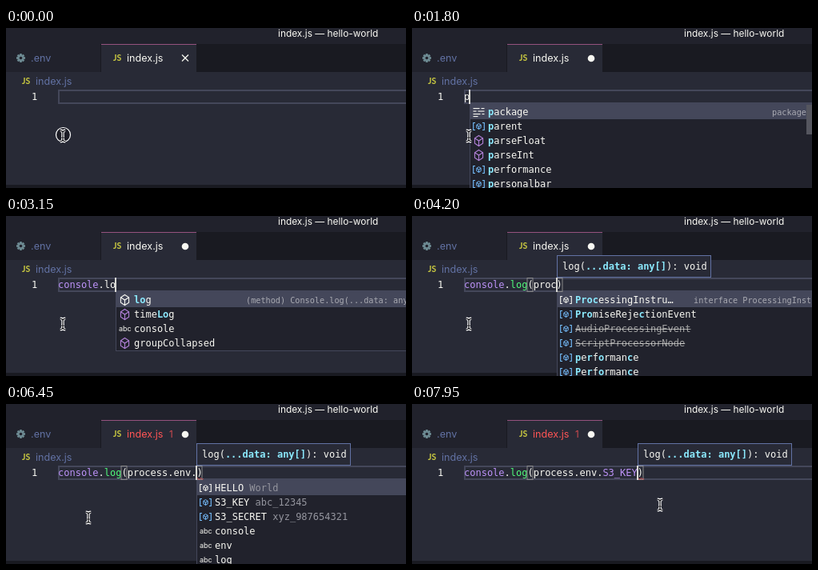
An HTML page with a canvas that plays this animation: 500x200 px, repeating every 8000 ms.

```html
<!DOCTYPE html>
<html lang="en">
<head>
<meta charset="utf-8">
<title>Editor typing</title>
<style>
  html, body { margin: 0; width: 100%; height: 100%; overflow: hidden; background: #282a36; }
  canvas { display: block; width: 500px; height: 200px; }
</style>
</head>
<body>
<canvas id="stage"></canvas>
<script>
const LOOP = 8000, STEP = 150;
const MONO = '"DejaVu Sans Mono", monospace';
const UI = 'Inter, sans-serif';
const C = {
  editor: '#282a36', bar: '#21222c', strip: '#191a21', line: '#44475a', fg: '#f8f8f2',
  muted: '#6272a4', purple: '#bd93f9', green: '#50fa7b', cyan: '#8be9fd', red: '#ff5555',
  yellow: '#cbcb41', gear: '#6d8a92', detail: '#a9aab2', variable: '#75beff', method: '#b180d7'
};
const LEFT = 65, ROW = 18, LINE_TOP = 77, LIST_TOP = 95;

const canvas = document.getElementById('stage');
const ctx = canvas.getContext('2d');
const ratio = window.devicePixelRatio || 1;
canvas.width = 500 * ratio;
canvas.height = 200 * ratio;
ctx.scale(ratio, ratio);
ctx.font = `12px ${MONO}`;
const CW = ctx.measureText('m').width;

// Each entry: kind, label, and optionally an inline value or a side note with its offset.
// Kinds: k keyword, v variable, m method, t plain word.
const item = (kind, label, extra = {}) => ({ kind, label, ...extra });
const items = (kind, names) => names.split(' ').map(name => item(kind, name));
const old = label => item('v', label, { deprecated: true });
const processing = item('v', 'ProcessingInstru…', { note: 'interface ProcessingInstruction', at: 171 });
const logCall = item('m', 'log', { note: '(method) Console.log(...data: any[]): void', at: 163 });
const audioNodes = [old('AudioProcessingEvent'), old('ScriptProcessorNode')];
const LISTS = {
  p: [item('k', 'package', { note: 'package', at: 378 }), item('v', 'parent'),
      ...items('m', 'parseFloat parseInt'), ...items('v', 'performance personalbar')],
  pro: [item('m', 'prompt'), processing, ...items('v', 'ProgressEvent Promise PromiseRejectionEvent'), item('k', 'protected')],
  proc: [processing, item('v', 'PromiseRejectionEvent'), ...audioNodes, ...items('v', 'performance Performance')],
  proce: [processing, ...audioNodes],
  c: [...items('v', 'caches'), ...items('m', 'cancelAnimationFrame cancelIdleCallback'), ...items('k', 'case catch class')],
  con: [item('v', 'console'), item('k', 'const'), item('k', 'continue'), item('m', 'confirm'),
        ...items('v', 'ConstantSourceNode ConvolverNode')],
  members: items('m', 'assert clear count countReset debug dir'),
  log: [logCall, item('m', 'timeLog'), item('t', 'console'), item('m', 'groupCollapsed')],
  words: items('t', 'console log'),
  word: items('t', 'console'),
  env: [item('v', 'HELLO', { value: 'World' }), item('v', 'S3_KEY', { value: 'abc_12345' }),
        item('v', 'S3_SECRET', { value: 'xyz_987654321' }), ...items('t', 'console env log process')]
};

// Start time, text before the caret, open suggestion list.
const CALL = 'console.log(';
const EDITS = [
  [0, ''], [1050, 'p'], [1200, 'pro', 'pro'], [1650, 'pr', 'pro'], [1800, 'p', 'p'], [1950, ''],
  [2100, 'c', 'c'], [2250, 'con', 'con'], [2400, 'cons', 'con'], [2700, 'console'],
  [2850, 'console.', 'members'], [3000, 'console.l', 'log'], [3150, 'console.lo', 'log'],
  [3300, 'console.log', 'log'], [3450, CALL],
  [3900, CALL + 'p', 'p'], [4050, CALL + 'pro', 'pro'], [4200, CALL + 'proc', 'proc'],
  [4350, CALL + 'proce', 'proce'], [4500, CALL + 'proces', 'proce'], [4650, CALL + 'process', 'proce'],
  [4800, CALL + 'process.', 'words'], [4950, CALL + 'process.en', 'word'], [5100, CALL + 'process.env'],
  [5550, CALL + 'process.env.', 'env'], [7800, CALL + 'process.env.S3_KEY']
];

const MOUSE = [[103, 142], [150, 147], [197, 147], [241, 143], [276, 136], [300, 129], [310, 126]];

function box(x, y, w, h, fill) {
  ctx.fillStyle = fill;
  ctx.fillRect(x, y, w, h);
}

function frame(x, y, w, h, color, weight = 1) {
  ctx.strokeStyle = color;
  ctx.lineWidth = weight;
  ctx.strokeRect(x + weight / 2, y + weight / 2, w - weight, h - weight);
}

function label(text, x, y, color, font) {
  ctx.font = font;
  ctx.fillStyle = color;
  ctx.fillText(text, x, y);
}

function mono(text, x, y, color = C.fg, bold = false) {
  label(text, x, y, color, `${bold ? 'bold ' : ''}12px ${MONO}`);
  return x + text.length * CW;
}

function stroke(color, width, points, closed) {
  ctx.strokeStyle = color;
  ctx.lineWidth = width;
  ctx.beginPath();
  points.forEach(([x, y]) => ctx.lineTo(x, y));
  if (closed) ctx.closePath();
  ctx.stroke();
}

function disc(x, y, r, fill) {
  ctx.fillStyle = fill;
  ctx.beginPath();
  ctx.arc(x, y, r, 0, Math.PI * 2);
  ctx.fill();
}

function gear(x, y) {
  for (let i = 0; i < 8; i++) {
    ctx.save();
    ctx.translate(x, y);
    ctx.rotate(i * Math.PI / 4);
    box(-1.3, -5.5, 2.6, 3, C.gear);
    ctx.restore();
  }
  disc(x, y, 4.2, C.gear);
  disc(x, y, 1.8, C.bar);
}

function cube(x, y, r, color, width) {
  const corner = i => [x + r * 0.9 * Math.sin(i * Math.PI / 3), y - r * Math.cos(i * Math.PI / 3)];
  stroke(color, width, [0, 1, 2, 3, 4, 5].map(corner), true);
  stroke(color, width, [corner(5), [x, y], corner(1)]);
  stroke(color, width, [[x, y], corner(3)]);
}

function icon(kind, x, y, selected) {
  if (kind === 't') {
    label('abc', x - 7.5, y + 3, C.fg, `9px ${UI}`);
  } else if (kind === 'm') {
    cube(x, y, 6.5, selected ? C.fg : C.method, 1.1);
  } else if (kind === 'v') {
    const color = selected ? C.fg : C.variable;
    for (const s of [-1, 1])
      stroke(color, 1.1, [[x + s * 4.5, y - 4.5], [x + s * 6.8, y - 4.5], [x + s * 6.8, y + 4.5], [x + s * 4.5, y + 4.5]]);
    cube(x, y, 3.4, color, 1);
  } else {
    for (const [dx, dy, w] of [[-7, -5, 8], [3, -5, 4], [-7, -1.5, 4], [-1, -1.5, 8], [-7, 2, 9], [4, 2, 3], [-7, 5, 6]])
      box(x + dx, y + dy, w, 1.1, C.fg);
  }
}

// Indices of the letters that match the typed query.
function matches(text, query) {
  const low = text.toLowerCase(), q = query.toLowerCase();
  const start = low.indexOf(q);
  if (start >= 0) return [...q].map((_, i) => start + i);
  const found = [];
  for (let i = 0; i < low.length && found.length < q.length; i++)
    if (low[i] === q[found.length]) found.push(i);
  return found.length === q.length ? found : [];
}

function suggestions(list, x, query, mouse) {
  const height = list.length * ROW + 2;
  box(x, LIST_TOP, 430, height, C.bar);
  list.forEach((entry, i) => {
    const top = LIST_TOP + 1 + i * ROW, base = top + 13;
    const hovered = mouse[0] > x && mouse[1] >= top && mouse[1] < top + ROW;
    if (i === 0) box(x, top, 430, ROW, C.line);
    else if (hovered) box(x, top, 430, ROW, 'rgba(68,71,90,.46)');
    icon(entry.kind, x + 11.5, top + 9, i === 0);

    const textX = x + 23, hits = matches(entry.label, query);
    ctx.globalAlpha = entry.deprecated ? 0.6 : 1;
    [...entry.label].forEach((ch, k) => {
      const hit = hits.includes(k) && !entry.deprecated;
      mono(ch, textX + k * CW, base, hit ? C.cyan : C.fg, hit);
    });
    if (entry.deprecated) box(textX, top + 9, entry.label.length * CW, 1, C.fg);
    ctx.globalAlpha = 1;
    if (entry.value) mono(entry.value, textX + (entry.label.length + 1) * CW, base, '#94959e');
    if (entry.note) label(entry.note, x + entry.at, base - 0.5, C.detail, `10.2px ${MONO}`);
  });
  frame(x, LIST_TOP, 430, height, C.line);
  if (list === LISTS.p) box(x + 421, LIST_TOP + 1, 9, 37, '#55565f');
}

function hint(x) {
  box(x, 49, 193, 28, C.editor);
  frame(x, 49, 193, 28, C.muted);
  let end = mono('log(', x + 7, 67);
  end = mono('...data: any[]', end, 67, C.cyan, true);
  mono('): void', end, 67);
}

function code(text) {
  const [, object, dot, method, rest] = /^(\w*)(\.?)(\w*)(.*)$/.exec(text);
  let x = mono(object, LEFT, 90, dot ? C.purple : C.fg);
  x = mono(dot, x, 90);
  x = mono(method, x, 90, rest ? C.green : C.fg);
  const [plain, key = ''] = rest.split(/(S3_KEY)/);
  x = mono(plain, x, 90);
  mono(key, x, 90, C.purple);
}

function squiggle(x) {
  const points = [];
  for (let i = 0; i <= 8; i++) points.push([x + i, 93.5 - Math.sin(i * Math.PI / 2)]);
  stroke(C.red, 1, points);
}

function pointer([x, y], pressed) {
  if (pressed) {
    ctx.beginPath();
    ctx.arc(x + 0.5, y - 1.5, 9, 0, Math.PI * 2);
    ctx.fillStyle = 'rgba(20,20,26,.6)';
    ctx.fill();
    ctx.strokeStyle = '#fff';
    ctx.lineWidth = 1.2;
    ctx.stroke();
  }
  for (const [color, width] of [['#fff', 3.4], ['#15151a', 1.2]]) {
    ctx.strokeStyle = color;
    ctx.lineWidth = width;
    ctx.beginPath();
    for (const s of [-1, 1]) {
      ctx.moveTo(x - 3.2, y + s * 6.7);
      ctx.quadraticCurveTo(x, y + s * 6.7, x, y + s * 4.5);
      ctx.quadraticCurveTo(x, y + s * 6.7, x + 3.2, y + s * 6.7);
    }
    ctx.moveTo(x, y - 5);
    ctx.lineTo(x, y + 5);
    ctx.moveTo(x - 2, y + 2);
    ctx.lineTo(x + 2, y + 2);
    ctx.stroke();
  }
}

function chrome(dirty, failed) {
  box(0, 0, 500, 200, C.editor);
  box(0, 0, 500, 20, C.bar);
  label('index.js — hello-world', 340, 11, C.fg, `11.9px ${UI}`);
  box(0, 20, 500, 35, C.strip);
  box(0, 20, 118, 35, C.bar);
  box(119, 20, 119, 35, C.editor);
  box(119, 20, 119, 1, '#94527e');
  box(0, 196, 500, 4, C.strip);

  gear(18.5, 37.5);
  const tabFont = `12.6px ${UI}`, jsFont = 'bold 10.5px Lato, sans-serif';
  label('.env', 31, 42, C.muted, tabFont);
  label('JS', 134, 41, C.yellow, jsFont);
  label('index.js', 151, 42, failed ? C.red : C.fg, tabFont);
  if (failed) label('1', 204, 42, '#d54c50', `11.5px ${UI}`);
  if (dirty) disc(224, 38, 4.3, C.fg);
  else {
    stroke(C.fg, 1.2, [[220, 33.5], [228, 41.5]]);
    stroke(C.fg, 1.2, [[228, 33.5], [220, 41.5]]);
  }
  label('JS', 20, 70, C.yellow, jsFont);
  label('index.js', 37, 71, C.muted, tabFont);
  mono('1', 32, 90);
  frame(LEFT, LINE_TOP, 440, ROW, C.line, 2);
}

function draw(time) {
  const t = Math.floor(time / STEP) * STEP;
  const within = (a, b) => t >= a && t < b;
  const [, text, listName] = EDITS.findLast(([start]) => start <= t);
  const caret = LEFT + text.length * CW;
  const inCall = text.includes('(');
  const mouse = t < 6450 ? [71, 135] : MOUSE[Math.min((t - 6450) / STEP, MOUSE.length - 1)];

  chrome(t >= 1050, t >= 6000);
  code(text);
  if (inCall) {
    mono(')', caret, 90);
    frame(Math.round(LEFT + 11 * CW) - 0.5, LINE_TOP, 8, ROW, '#888888');
    frame(Math.round(caret) - 0.5, LINE_TOP, 8, ROW, '#888888');
  }
  if (t >= 5850) squiggle(caret);

  const edge = Math.round(caret);
  if (listName) suggestions(LISTS[listName], edge, /\w*$/.exec(text)[0], mouse);
  if (t >= 3600) hint(t === 7800 ? 238 : edge);
  const caretHidden = t < 450 || within(6000, 6450) || within(7050, 7500);
  if (!caretHidden) box(text ? edge - 1 : LEFT, LINE_TOP, 2, ROW, '#d8d8d4');
  pointer(mouse, t < 150 || t === 7800);
}

const begin = performance.now();
function tick() {
  draw((performance.now() - begin) % LOOP);
  requestAnimationFrame(tick);
}
tick();
</script>
</body>
</html>
```
